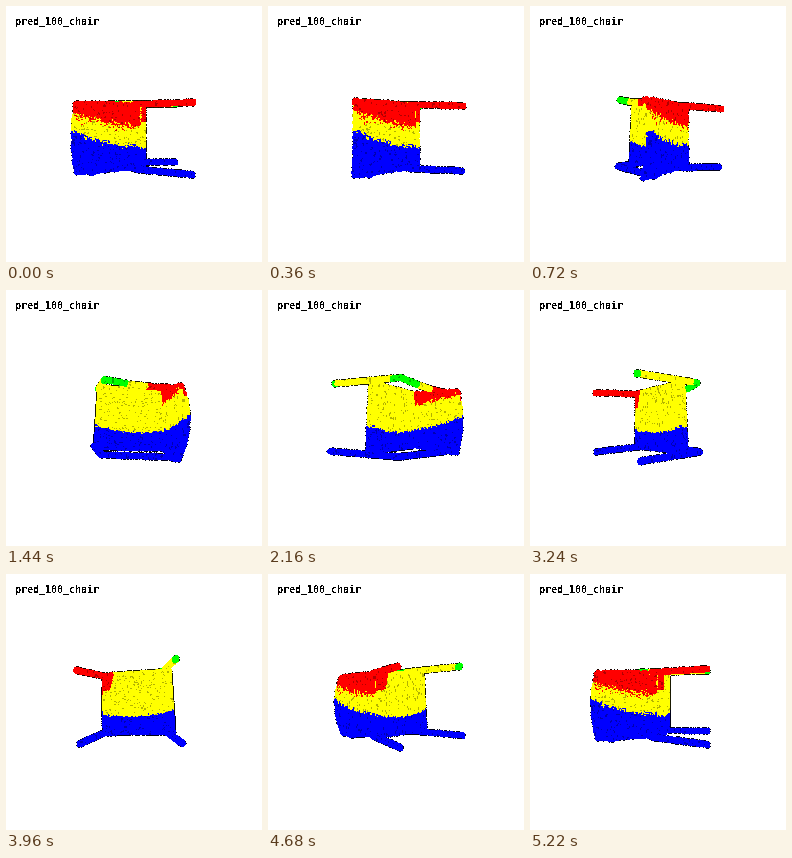
Recreate the animation shown at these times as a matplotlib script. Size 256x256 px, loop 5400 ms.

```python
import numpy as np
import matplotlib.pyplot as plt
from matplotlib.animation import FuncAnimation

SIZE, FRAMES, STEP = 256, 30, 180
CENTER, CAMERA = 128, 250
RED, YELLOW, BLUE, GREEN = np.array(
    [(1, 0, 0), (1, 1, 0), (0, 0, 1), (0, 1, 0)])

rng = np.random.default_rng(7)
points, colors = [], []


def lerp(a, b, t):
    return a + (b - a) * t


def pick(mask, yes, no):
    return np.where(mask[:, None], yes, no)


def add(leg, y, front, color):
    """Axes: leg = towards the feet, y = screen down, front = seat front."""
    points.append(np.column_stack([leg, y, front]))
    colors.append(np.broadcast_to(color, (len(leg), 3)))


def limb(start, end, paint, n=1000, radius=1.5, curve=lambda t: t):
    """Round bar from start to end; curve eases its height."""
    t, a = rng.random(n), rng.uniform(0, 2 * np.pi, n)
    leg, y, front = (lerp(p, q, t) for p, q in zip(start, end))
    y = lerp(start[1], end[1], curve(t))
    color = paint(leg, front) if callable(paint) else paint
    u, v = radius * np.cos(a), radius * np.sin(a)
    if abs(end[0] - start[0]) > abs(end[2] - start[2]):
        add(leg, y + u, front + v, color)
    else:
        add(leg + v, y + u, front, color)


def backrest(n, rear):
    u, v = rng.random((2, n))        # top to seat, red side to blue side
    bow = 4 * v * (1 - v)
    leg = lerp(-51.5, 4, u) - 1.2 * bow * (1 - u)
    y = lerp(lerp(-28.2, -27.5, u), lerp(34.8, 30, u), v)
    front = lerp(lerp(-33, -30.5, v), -30, u) - bow * lerp(7, 1, u)
    fade = (1 - u) ** 2
    red = -7 - 10 * fade if rear else lerp(-24, -13, u)
    blue = (10 if rear else 12) - 13 * fade
    fuzz = rng.normal(0, 2 if rear else 1.2, n)
    color = pick(y < red + fuzz, RED,
                 pick(y < blue + 0.6 * fuzz, YELLOW, BLUE))
    add(leg, y, front + (0 if rear else 2.5), color)


def seat():
    """Six faces of a slab that gets thinner towards the front."""
    for axis, n in enumerate([1100, 1000, 5200]):
        for side in (0, 1):
            uvw = rng.random((3, n))
            uvw[axis] = side
            u, v, w = uvw
            y = lerp(lerp(-27.5, -31.5, u), lerp(31, 29.5, u), v)
            front = lerp(-28.5, lerp(35, 39, v), u)
            leg = lerp(-2.5, lerp(9, 4, u), w)
            blue = 12 + 11 * u - 15.5 * u ** 2 + rng.normal(0, 0.4, n)
            corner = (w > 0.7) & (y < -11) & (front < -26 - 0.25 * y)
            add(leg, y, front,
                pick(corner, RED, pick(y < blue, YELLOW, BLUE)))


def post_paint(leg, front):
    return pick((leg > 45.5) | (leg < -17), GREEN, YELLOW)


def arm_paint(leg, front):
    return pick(front > 9, GREEN, pick(front > -8, YELLOW, RED))


backrest(4600, rear=True)
backrest(4200, rear=False)
seat()
# back legs, front posts, arms
limb((0, -26.5, -30), (49.5, -26.5, -43), RED)
limb((0, 30.5, -30), (49.5, 33.8, -40), BLUE)
limb((-26, -34.5, 29), (49, -34.5, 38), post_paint, 1400)
limb((-26, 32, 32), (49, 32, 43), BLUE, 1400)
limb((-26, -34.5, 29), (-38, -26.5, -32), arm_paint, 1200,
     curve=lambda t: np.sin(np.pi * t / 2))
limb((-26, 32, 32), (-38, 33.5, -31), BLUE, 1200)

P = np.vstack(points)
grain = np.where(rng.random(len(P)) < 0.08, 0.7, 1)
C = np.vstack(colors) * 255 * grain[:, None]
rim = rng.random(len(P)) < 0.25


def render(i):
    a = 2 * np.pi * i / FRAMES
    leg, y, front = P.T
    x = leg * np.cos(a) - front * np.sin(a)
    near = -leg * np.sin(a) - front * np.cos(a)
    scale = 1 / (1 - near / CAMERA)
    px = np.rint(CENTER + x * scale).astype(int)
    py = np.rint(CENTER + y * scale).astype(int)
    img = np.full((SIZE, SIZE, 3), 255, np.uint8)

    # dark dotted rim, only left visible along the silhouette
    for dx, dy in ((2, 0), (-2, 0), (0, 2), (0, -2)):
        img[py[rim] + dy, px[rim] + dx] = C[rim] * 0.1

    # 3 x 3 dots, nearest one wins
    d = np.array([(dx, dy) for dx in (-1, 0, 1) for dy in (-1, 0, 1)])
    r2 = (d ** 2).sum(axis=1)
    depth = (near + np.sqrt(4 - r2)[:, None]).ravel()
    order = np.argsort(depth, kind="stable")
    cols = (px + d[:, :1]).ravel()[order]
    rows = (py + d[:, 1:]).ravel()[order]
    img[rows, cols] = C[order % len(P)]
    return img


fig = plt.figure(figsize=(2.56, 2.56), dpi=100, facecolor="white")
ax = fig.add_axes([0, 0, 1, 1])
ax.axis("off")
view = ax.imshow(render(0), interpolation="nearest",
                 extent=(0, SIZE, SIZE, 0), aspect="auto")
title = ax.text(9.5, 19, "pred_100_chair", family="DejaVu Sans Mono",
                weight="bold", size=7.2, color="black", va="baseline")
title.set_antialiased(False)


def update(i):
    view.set_data(render(i))
    return [view]


anim = FuncAnimation(fig, update, frames=FRAMES, interval=STEP,
                     repeat=True, repeat_delay=0, blit=False)
plt.show()
```
